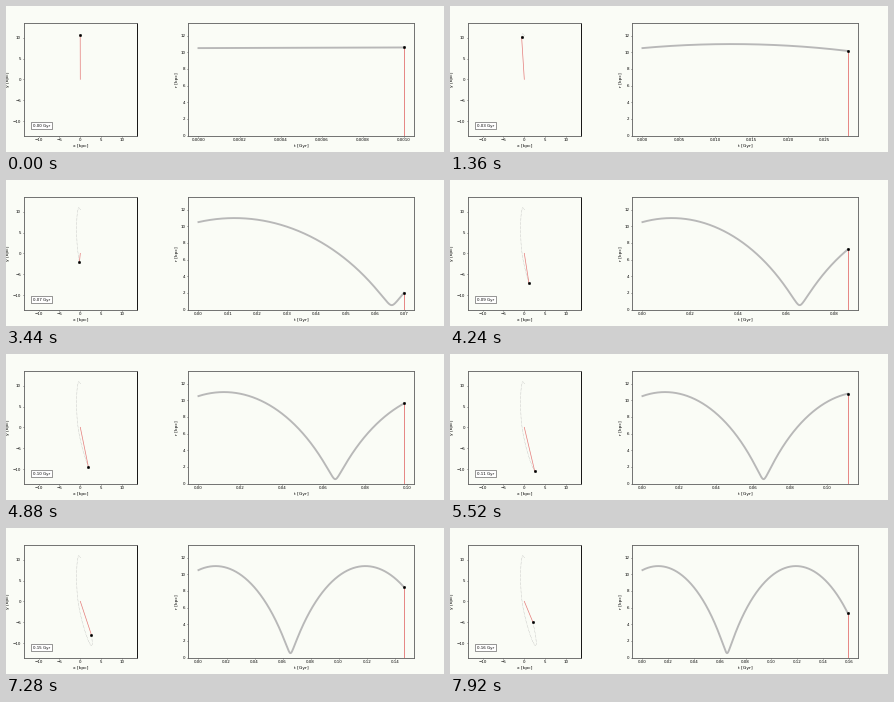
Write a matplotlib script that moves like this. It is 438 px wide and 146 px high and loops after 8000 ms.

```python
import numpy as np
import matplotlib.pyplot as plt
from matplotlib.animation import FuncAnimation

DPI = 29.2
WIDTH, HEIGHT = 438, 146
FRAMES = 100
INTERVAL = 80
BACKGROUND = "#fafcf6"
RED = "#d62728"

DT = 1e-4           # Gyr
FIRST, STRIDE = 10, 16
V_CIRC = 271.8      # kpc / Gyr
CORE = 2.2          # kpc
LIMIT = 13.5        # kpc


def px(width):
    """Convert pixels to points."""
    return width * 72 / DPI


def acceleration(pos):
    return -V_CIRC**2 * pos / (pos @ pos + CORE**2)


def integrate_orbit(steps):
    """Leapfrog orbit in a cored logarithmic potential."""
    pos, vel = np.array([0.0, 10.5]), np.array([-24.7, 79.5])
    path = [pos]
    for _ in range(steps):
        half = vel + 0.5 * DT * acceleration(pos)
        pos = pos + DT * half
        vel = half + 0.5 * DT * acceleration(pos)
        path.append(pos)
    return np.array(path)


orbit = integrate_orbit(FIRST + STRIDE * FRAMES)
radius = np.hypot(*orbit.T)
time = DT * np.arange(len(orbit))

plt.rcParams.update({
    "font.family": "DejaVu Sans",
    "font.size": 10,
    "axes.labelsize": 11,
    "axes.linewidth": px(0.9),
    "axes.edgecolor": "0.4",
    "xtick.major.width": px(0.5),
    "ytick.major.width": px(0.5),
})

fig = plt.figure(figsize=(15, 5), dpi=DPI, facecolor=BACKGROUND)


def add_panel(left, width, **settings):
    ax = fig.add_axes([left / WIDTH, 16.4 / HEIGHT, width / WIDTH, 112.5 / HEIGHT],
                      facecolor=BACKGROUND)
    ax.set(**settings)
    return ax


plane = add_panel(17.9, 112.8, xlim=(-LIMIT, LIMIT), ylim=(-LIMIT, LIMIT),
                  xlabel="x [kpc]")
plane.set_ylabel("y [kpc]", labelpad=px(2.4))
plane.spines["right"].set_color("black")
history = add_panel(182.2, 226, ylim=(0, LIMIT),
                    xlabel="t [Gyr]", ylabel="r [kpc]")


def add_artists(ax, trail_style, arm_width):
    trail, = ax.plot([], [], **trail_style)
    arm, = ax.plot([], [], color=RED, alpha=0.6, lw=px(arm_width))
    dot, = ax.plot([], [], "o", color="black", ms=px(2.6), mew=px(0.3))
    return trail, arm, dot


plane_trail, plane_arm, plane_dot = add_artists(
    plane, dict(color="0.6", lw=px(0.5), ls=":"), 0.7)
hist_trail, hist_arm, hist_dot = add_artists(
    history, dict(color="0.72", lw=px(1.9)), 0.9)

clock = plane.text(0.08, 0.08, "", transform=plane.transAxes,
                   bbox=dict(facecolor="white", edgecolor="0.2", lw=px(0.5)))


def update(frame):
    i = FIRST + STRIDE * frame
    now, r = time[i], radius[i]
    x, y = orbit[i]

    plane_trail.set_data(*orbit[:i + 1].T)
    plane_arm.set_data([0, x], [0, y])
    plane_dot.set_data([x], [y])
    clock.set_text(f"{now:.2f} Gyr")

    hist_trail.set_data(time[:i + 1], radius[:i + 1])
    hist_arm.set_data([now, now], [0, r])
    hist_dot.set_data([now], [r])
    history.set_xlim(-0.05 * now, 1.05 * now)
    return ()


animation = FuncAnimation(fig, update, frames=FRAMES, interval=INTERVAL,
                          repeat=True, repeat_delay=0, blit=False)
plt.show()
```
